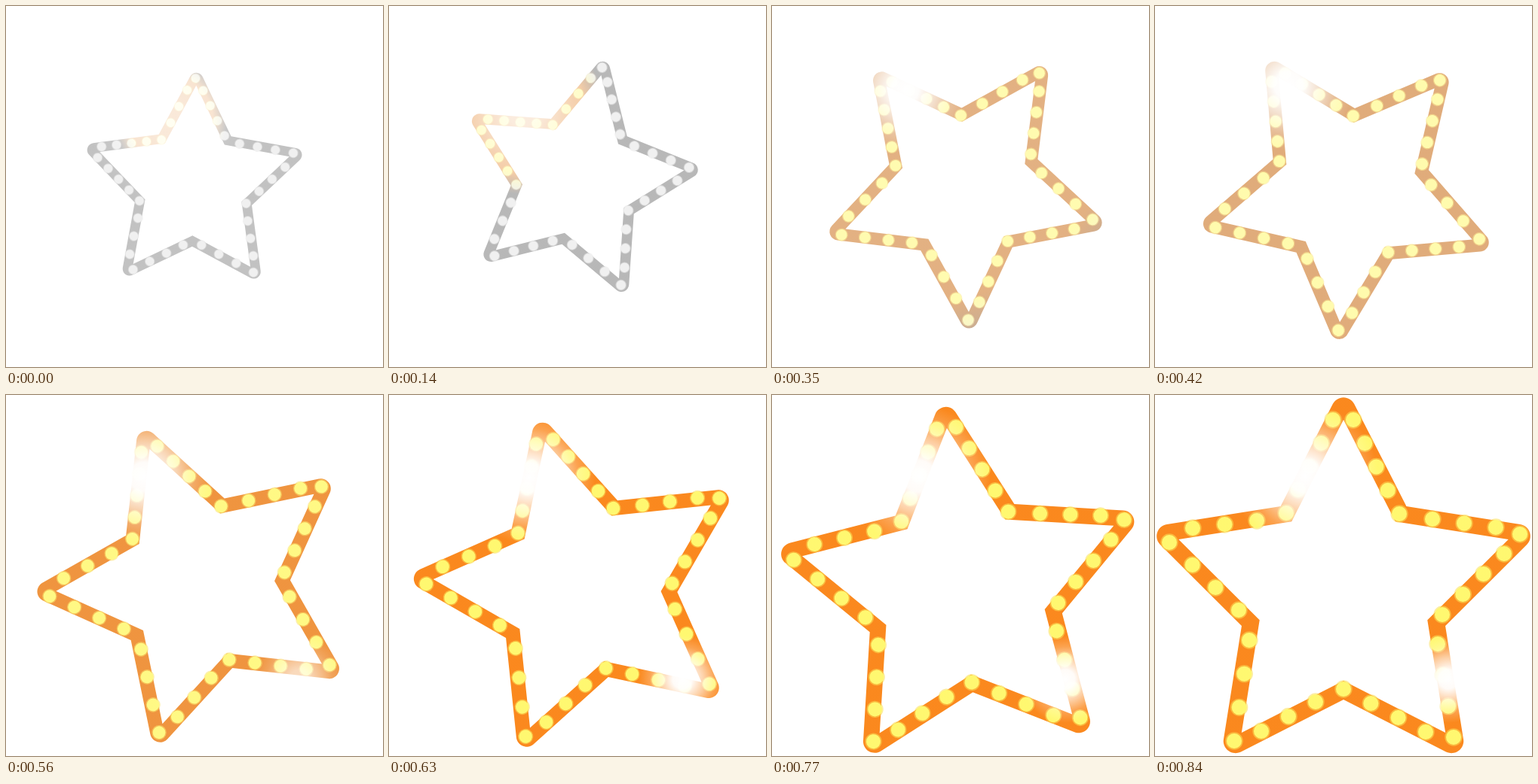
An HTML page with a canvas for the animation above (0.91 s loop, 500x480 px).

```html
<!DOCTYPE html>
<html lang="en">
<head>
<meta charset="utf-8">
<title>Spinning marquee star</title>
<style>
html, body { margin: 0; width: 100%; height: 100%; overflow: hidden; background: #fff; }
canvas { display: block; }
</style>
</head>
<body>
<canvas id="stage" width="500" height="480"></canvas>
<script>
const ctx = document.getElementById('stage').getContext('2d');
const STEP = 70, STEPS = 13;

// step, centre x, y, scale, angle, shine x, y, radius, strength, warm radius, saturation, lightness, bulb lightness
const KEYS = [
  [0, 249, 238, .575, 1.4, 218, 150, 110, .35, 75, 75, 87, 96],
  [2, 249.3, 231, .62, 13, 177, 140, 90, .65, 110, 78, 80, 89],
  [4, 252.8, 233.8, .693, 28, 176, 116, 78, 1, 170, 64, 72, 85],
  [6, 257.4, 244.4, .766, 40, 177, 106, 85, 1, 600, 62, 68, 84],
  [9, 258.8, 255.6, .871, 57, 186, 110, 88, 1, 600, 96, 55, 72],
  [11, 253.2, 261.2, .949, 66.4, 195, 108, 95, 1, 600, 96, 55, 72],
  [12, 250, 263, 1, 72, 199, 108, 97, 1, 600, 96, 55, 72]
];

// Evenly spaced runs of bulbs around the upright star: count, from x, y, to x, y
const RUNS = [
  [5, 263, 33, 324, 158], [3, 368, 165, 452, 176], [1, 484, 185, 484, 185],
  [4, 463, 211, 381, 292], [4, 375, 331, 396, 455], [4, 359, 448, 250, 391],
  [3, 213, 408, 141, 447], [4, 105, 460, 125, 326], [4, 111, 286, 19, 196],
  [3, 50, 177, 135, 167], [5, 174, 157, 236, 33]
];

const lerp = (a, b, t) => a + (b - a) * t;

function starPoints(outer, inner) {
  return Array.from({ length: 10 }, (_, i) => {
    const a = i * Math.PI / 5, r = i % 2 ? inner : outer;
    return [r * Math.sin(a), -r * Math.cos(a)];
  });
}

function makeBand() {
  const path = new Path2D();
  const rim = starPoints(279, 142);
  path.moveTo(...rim[9]);
  for (let i = 0; i < 10; i += 2) {
    path.arcTo(...rim[i], ...rim[i + 1], 16);
    path.lineTo(...rim[i + 1]);
  }
  path.closePath();
  starPoints(230, 117).forEach((p, i) => i ? path.lineTo(...p) : path.moveTo(...p));
  path.closePath();
  return path;
}

function makeBulbs(radius) {
  const path = new Path2D();
  for (const [count, x0, y0, x1, y1] of RUNS) {
    for (let i = 0; i < count; i++) {
      const t = i / Math.max(1, count - 1);
      const x = lerp(x0, x1, t) - 250, y = lerp(y0, y1, t) - 263;
      path.moveTo(x + radius, y);
      path.arc(x, y, radius, 0, 2 * Math.PI);
    }
  }
  return path;
}

const band = makeBand(), halos = makeBulbs(11.7), cores = makeBulbs(10);

function poseAt(n) {
  const i = KEYS.findIndex(k => k[0] >= n);
  const b = KEYS[i], a = KEYS[Math.max(0, i - 1)];
  const t = a === b ? 0 : (n - a[0]) / (b[0] - a[0]);
  return a.map((v, j) => lerp(v, b[j], t));
}

function radial(x, y, r, stops) {
  const g = ctx.createRadialGradient(x, y, 0, x, y, r);
  stops.forEach(([at, colour]) => g.addColorStop(at, colour));
  ctx.fillStyle = g;
}

function shine(x, y, r, strength) {
  const white = a => `rgba(255,255,255,${a * strength})`;
  radial(x, y, r, [[0, white(1)], [.22, white(.97)], [.5, white(.6)], [.75, white(.22)], [1, white(0)]]);
  ctx.fillRect(0, 0, 500, 480);
}

function draw(n) {
  const [, x, y, scale, angle, sx, sy, sr, strength, warmR, sat, light, bulb] = poseAt(n);
  const pose = new DOMMatrix().translate(x, y).rotate(angle - 72).scale(scale);

  // Warm colour near the shine, grey beyond it
  const paint = (shape, warm, grey) => {
    const placed = new Path2D();
    placed.addPath(shape, pose);
    radial(sx, sy, warmR, [[0, warm], [.75, warm], [1, grey]]);
    ctx.fill(placed, 'evenodd');
  };

  ctx.fillStyle = '#fff';
  ctx.fillRect(0, 0, 500, 480);
  paint(band, `hsl(29, ${sat}%, ${light}%)`, `hsl(0, 0%, ${76 - 2 * n}%)`);
  ctx.globalAlpha = .55;
  paint(halos, `hsl(50, 95%, ${bulb - 6}%)`, '#e8e8e8');
  ctx.globalAlpha = 1;
  paint(cores, `hsl(57, 100%, ${bulb}%)`, '#f0f0f0');

  shine(sx, sy, sr, strength);
  shine(389, 378, 58, Math.min(1, Math.max(0, (n - 6) / 3)));
}

function tick() {
  draw(Math.floor(performance.now() / STEP) % STEPS);
  requestAnimationFrame(tick);
}
tick();
</script>
</body>
</html>
```
